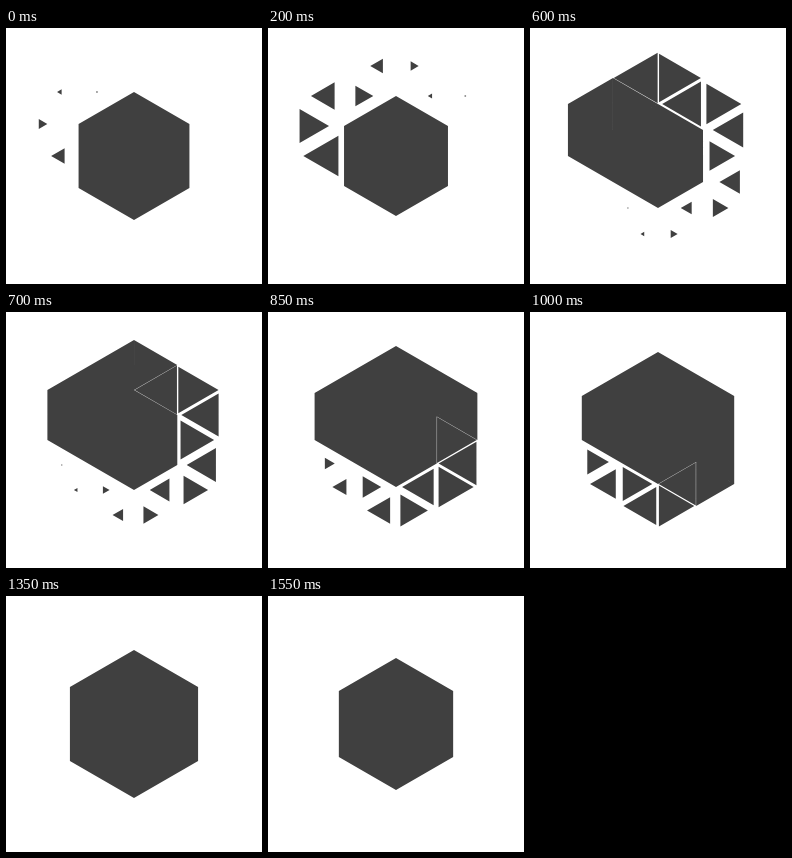
An HTML page with a canvas for the animation above (1.6 s loop, 256 by 256 pixels).

```html
<!DOCTYPE html>
<html lang="en">
<head>
<meta charset="utf-8">
<title>Hexagon ring</title>
<style>
  html, body { margin: 0; width: 100%; height: 100%; overflow: hidden; background: #fff; }
  canvas { display: block; width: 256px; height: 256px; }
</style>
</head>
<body>
<canvas id="stage" width="256" height="256"></canvas>
<script>
const ctx = document.getElementById('stage').getContext('2d');
const LOOP = 1600, TICK = 50;
const COUNT = 18, FIRST = -230, STAGGER = 50, GROW = 700;
const H = Math.sqrt(3) / 2;

// One sixth of the ring, in units of the inner radius: centre and direction of the tip
const SECTOR = [
  { x: -4 * H / 3, y: 0, tip: Math.PI },
  { x: -5 * H / 3, y: -0.5, tip: 0 },
  { x: -4 * H / 3, y: -1, tip: Math.PI }
];

const ease = x => (1 - Math.cos(Math.PI * Math.min(1, Math.max(0, x)))) / 2;

function addPolygon(cx, cy, radius, sides, angle) {
  for (let i = 0; i < sides; i++) {
    const a = angle + i * 2 * Math.PI / sides;
    const x = cx + radius * Math.cos(a), y = cy + radius * Math.sin(a);
    if (i) ctx.lineTo(x, y); else ctx.moveTo(x, y);
  }
  ctx.closePath();
}

function draw(t) {
  const unit = 64 - 32 * t / LOOP;
  ctx.fillStyle = '#fff';
  ctx.fillRect(0, 0, 256, 256);
  ctx.fillStyle = '#404040';

  // A single path keeps joined triangles free of seams
  ctx.beginPath();
  addPolygon(128, 128, unit, 6, -Math.PI / 2);
  for (let i = 0; i < COUNT; i++) {
    const size = ease((t - FIRST - i * STAGGER) / GROW);
    if (size < 0.01) continue;
    const { x, y, tip } = SECTOR[i % 3];
    const turn = Math.floor(i / 3) * Math.PI / 3;
    const c = Math.cos(turn), s = Math.sin(turn);
    addPolygon(
      128 + unit * (x * c - y * s),
      128 + unit * (x * s + y * c),
      size * unit / Math.sqrt(3), 3, tip + turn
    );
  }
  ctx.fill();
}

const start = performance.now();
function frame() {
  const t = (performance.now() - start) % LOOP;
  draw(Math.floor(t / TICK) * TICK);
  requestAnimationFrame(frame);
}
frame();
</script>
</body>
</html>
```
